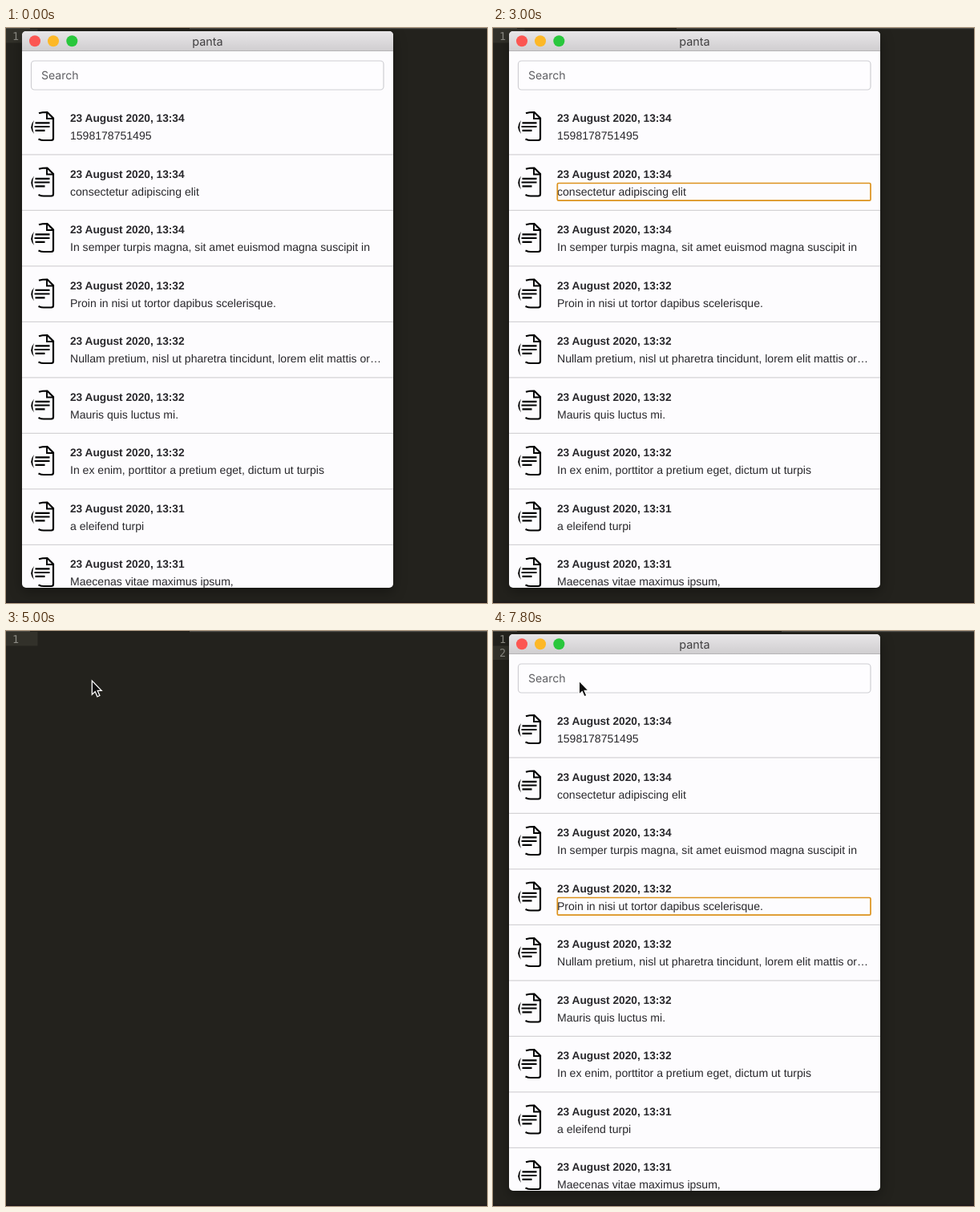
Animation of 600x717 px, one loop 8 s. Source, as an HTML page:

```html
<!DOCTYPE html>
<html lang="en">
<head>
<meta charset="utf-8">
<title>Clipboard history</title>
<style>
  html, body { margin: 0; width: 100%; height: 100%; overflow: hidden; background: #23221d; }
  svg { display: block; width: 600px; height: 717px; text-rendering: geometricPrecision; }
  .code { font: 13.44px "DejaVu Sans Mono", monospace; fill: #fafaf6; }
  .num { fill: #8c8b84; }
  .ui { font: 14.05px Inter, sans-serif; fill: #5f5f63; }
  .title { font-size: 14.4px; fill: #413f41; text-anchor: middle; }
  .date { font: bold 13.69px "Liberation Sans", Arial, sans-serif; fill: #29282c; }
  .item { font: 14.05px "Liberation Sans", Arial, sans-serif; fill: #29282c; }
  .shadow { filter: drop-shadow(0 5px 8px rgba(0, 0, 0, .35)); }
</style>
</head>
<body>
<svg viewBox="0 0 600 717">
  <defs>
    <linearGradient id="bar" x2="0" y2="1">
      <stop stop-color="#e8e6e8"/><stop offset="1" stop-color="#cfcdcf"/>
    </linearGradient>
    <clipPath id="frame"><rect x="20" y="4" width="463" height="694" rx="5"/></clipPath>
    <g id="doc" fill="none" stroke="#000" stroke-width="2.2">
      <path d="M35 115Q27.5 123.5 35 132Q31.5 123.5 35 115Z" fill="#000" stroke="none"/>
      <path d="M41 106.3Q45 105 51.5 105L59 112.5V137.5Q59 140 56.5 140H47Q44 140 40.5 138.4"/>
      <path d="M51 105V113H59" stroke-width="1.9"/>
      <path d="M36.5 118.3H54.5M35.5 123H54.5M36.5 127.8H48.5"/>
    </g>
  </defs>

  <rect width="600" height="717" fill="#23221d"/>
  <rect y="715.5" width="600" height="1.5" fill="#1f191a"/>
  <rect width="30" height="1" fill="#494843"/>
  <rect id="tabs" height="1.2" width="600" fill="#4e4d49"/>
  <rect id="gutter" width="39.5" height="17.5" fill="#32312a"/>
  <text class="code num" x="8" y="15">1</text>
  <text class="code num" id="second" x="8" y="32.3">2</text>
  <text class="code" id="pasted" x="45" y="15">Proin in nisi ut tortor dapibus scelerisque.</text>

  <g id="win">
    <rect class="shadow" x="20" y="4" width="463" height="694" rx="5" fill="#fdfcfe"/>
    <g clip-path="url(#frame)">
      <rect x="20" y="4" width="463" height="25" fill="url(#bar)"/>
      <rect x="20" y="28" width="463" height="1" fill="#b5b3b5"/>
      <circle cx="36" cy="16.3" r="7" fill="#fc5652"/>
      <circle cx="59" cy="16.3" r="7" fill="#fdb827"/>
      <circle cx="82.3" cy="16.3" r="7" fill="#29c73c"/>
      <text class="ui title" x="251.5" y="21.5">panta</text>
      <rect x="31.5" y="41" width="439.5" height="36" rx="4" fill="#fefdff" stroke="#cfcfd3" stroke-width="1.2"/>
      <text class="ui" x="44" y="64">Search</text>
      <g id="rows"></g>
      <rect id="ring" x="30" y="39.7" width="443" height="39.4" rx="3" fill="none" stroke="#5ca5f7" stroke-width="4.2"/>
      <rect id="focus" x="80.3" width="390.7" height="21.7" rx="1.5" fill="none" stroke="#dc921c" stroke-width="1.7"/>
    </g>
  </g>

  <path id="arrow" d="M107.3 62V79.2L111.2 75.6L113.9 81.8L116.9 80.5L114.2 74.4H119.2Z" fill="#0c0c0c" stroke="#fff" stroke-width="1.3"/>
  <path id="beam" d="M105 58.5Q108 58.5 108 61V75Q108 77.5 105 77.5M111 58.5Q108 58.5 108 61M108 75Q108 77.5 111 77.5" fill="none" stroke="#d8d8d4" stroke-width="1.2"/>
</svg>
<script>
const LOOP = 8000, PITCH = 69.5;
const items = [
  ["34", "1598178751495"],
  ["34", "consectetur adipiscing elit"],
  ["34", "In semper turpis magna, sit amet euismod magna suscipit in"],
  ["32", "Proin in nisi ut tortor dapibus scelerisque."],
  ["32", "Nullam pretium, nisl ut pharetra tincidunt, lorem elit mattis or…"],
  ["32", "Mauris quis luctus mi."],
  ["32", "In ex enim, porttitor a pretium eget, dictum ut turpis"],
  ["31", "a eleifend turpi"],
  ["31", "Maecenas vitae maximus ipsum,"]
];
const el = id => document.getElementById(id);
const show = (id, on) => el(id).setAttribute("visibility", on ? "visible" : "hidden");
const set = (id, name, value) => el(id).setAttribute(name, value);

el("rows").innerHTML = items.map(([minute, text], i) => `
  <g transform="translate(0 ${i * PITCH})">
    <use href="#doc"/>
    <text class="date" x="80" y="117">23 August 2020, 13:${minute}</text>
    <text class="item" x="80" y="139">${text}</text>
    <rect x="20" y="157.3" width="463" height="1.2" fill="#d3d2d5"/>
  </g>`).join("");

// Start time of each keyboard focus step through the list
const steps = [2600, 3000, 3400, 4000];

function draw(now) {
  const t = now % LOOP;
  const open = t < 5000 || t >= 7800;
  const pasted = t >= 6200, newline = t >= 7000;
  const row = steps.filter(s => t >= s).length - 1;

  el("win").style.display = open ? "" : "none";
  show("ring", t >= 1400 && t < 2600);
  show("focus", row >= 0);
  set("focus", "y", 124 + Math.max(row, 0) * PITCH);
  show("pasted", pasted);
  show("second", newline);
  set("gutter", "y", newline ? 18.5 : 1);
  set("tabs", "x", pasted ? 360 : 229);
  show("arrow", t >= 5000 && t < 5200 || t >= 7800);
  show("beam", t >= 5200 && t < 7000);
  requestAnimationFrame(draw);
}
draw(0);
</script>
</body>
</html>
```
